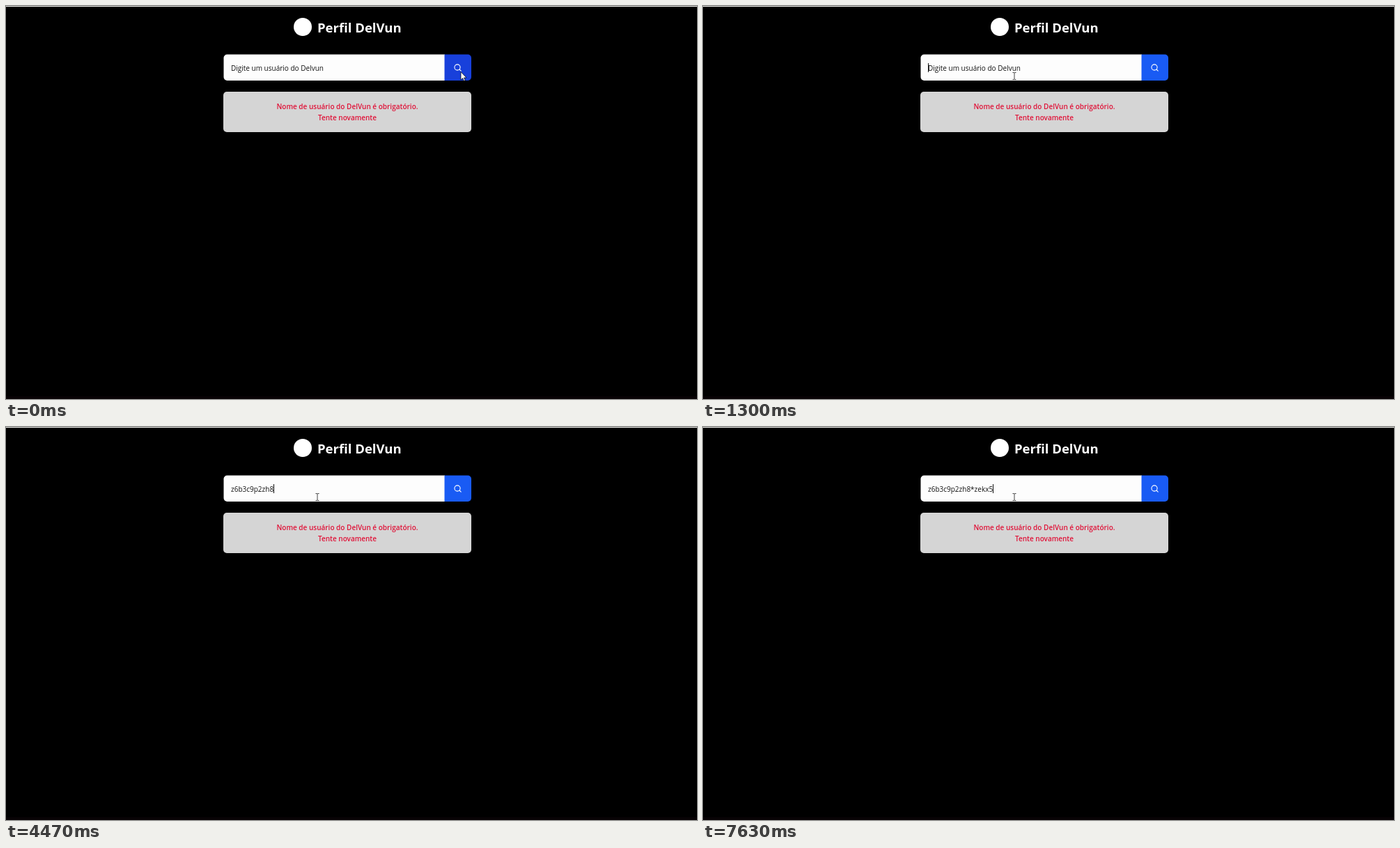
Animation of 992 by 564 pixels, one loop 8000 ms. Source, as an HTML page:

```html
<!DOCTYPE html>
<html lang="pt-BR">
<head>
<meta charset="utf-8">
<title>Perfil DelVun</title>
<style>
  html, body { margin: 0; width: 100%; height: 100%; overflow: hidden; background: #000; }
  svg { display: block; width: 992px; height: 564px; }
  text { font: 10px "Open Sans", "Noto Sans", sans-serif; white-space: pre; }
  .title { font-size: 18.5px; font-weight: 700; fill: #fff; }
  .error { font-weight: 600; fill: #e01238; text-anchor: middle; }
</style>
</head>
<body>
<svg viewBox="0 0 992 564">
  <rect width="992" height="564"/>
  <rect width="992" height="1" fill="#f4f4f0"/>
  <rect y="560" width="992" height="4" fill="#080305"/>

  <circle cx="426" cy="30" r="13" fill="#fff"/>
  <text class="title" x="447" y="37.5">Perfil DelVun</text>

  <path d="M630 69.5H317.5a5 5 0 0 0-5 5v27.500a5 5 0 0 0 5 5H630z" fill="#fdfdfd"/>
  <path id="button" d="M629.500 69.500H663a5 5 0 0 1 5 5v27.500a5 5 0 0 1-5 5H629.500z"/>
  <g fill="none" stroke="#fff" stroke-width="1.100" stroke-linecap="round">
    <circle cx="648" cy="88" r="4.100"/>
    <path d="M651 91l2.200 2.200"/>
  </g>
  <text id="field" x="323" y="92.500" fill="#151515"></text>
  <rect id="caret" y="82" width="1" height="13" fill="#111"/>

  <rect x="312" y="123" width="356" height="58" rx="5" fill="#d5d5d5"/>
  <text class="error" x="490" y="148">Nome de usuário do DelVun é obrigatório.</text>
  <text class="error" x="490" y="163.500">Tente novamente</text>

  <path id="arrow" d="M0 0V11.500L2.700 9.100L4.400 13L6.200 12.200L4.500 8.400H8z"
        fill="#fff" stroke="#000" stroke-width=".7"/>
  <path id="beam" d="M-2.500-5H-.8L0-4.400L.8-5H2.500M0-4.400V4.400M-2.500 5H-.8L0 4.400L.8 5H2.500"
        fill="none" stroke="#444" stroke-width="1"/>
</svg>
<script>
  const LOOP = 8000;
  const HINT = "Digite um usuário do Delvun";
  const TYPED = "z6b3c9p2zh8*zekx5";
  const BUTTON_LEFT = 629;
  const HOVER = [24, 64, 219], IDLE = [25, 91, 244];

  // Bursts of keys: start time, time per key, number of keys
  const BURSTS = [[2330, 0, 1], [3000, 30, 9], [3470, 0, 1], [5970, 60, 5], [6470, 0, 1]];
  // Times between which the caret is shown
  const CARET_ON = [[1150, 3470], [4470, 4800], [5430, 6470], [6700, 7030], [7630, LOOP]];

  const el = id => document.getElementById(id);
  const [button, field, caret, arrow, beam] = ["button", "field", "caret", "arrow", "beam"].map(el);
  const clamp = v => Math.min(1, Math.max(0, v));
  const smooth = s => s * s * (3 - 2 * s);
  const show = (node, on) => node.setAttribute("visibility", on ? "visible" : "hidden");

  function keysAt(t) {
    return BURSTS.reduce((sum, [start, step, count]) => {
      if (t < start) return sum;
      return sum + (step ? Math.min(count, 1 + Math.floor((t - start) / step)) : count);
    }, 0);
  }

  function drawPointer(t) {
    const s = clamp((t - 30) / 640);
    const x = 653 - 206 * smooth(s ** 1.9);
    const y = 94.5 + 6 * s ** 0.85;
    const place = `translate(${x.toFixed(1)} ${y.toFixed(1)})`;
    const over = x >= BUTTON_LEFT;
    arrow.setAttribute("transform", place);
    beam.setAttribute("transform", place);
    show(arrow, over);
    show(beam, !over);
  }

  function drawButton(t) {
    const k = smooth(clamp((t - 330) / 150));
    const mix = HOVER.map((v, i) => Math.round(v + (IDLE[i] - v) * k));
    button.setAttribute("fill", `rgb(${mix})`);
  }

  function drawField(t) {
    const n = keysAt(t);
    const label = n ? TYPED.slice(0, n) : HINT;
    if (field.textContent !== label) field.textContent = label;
    const end = n ? field.getComputedTextLength() : 0;
    caret.setAttribute("x", Math.round(323 + end - 0.5));
    show(caret, CARET_ON.some(([a, b]) => t >= a && t < b));
  }

  function render(t) {
    drawPointer(t);
    drawButton(t);
    drawField(t);
  }

  const begin = performance.now();
  function tick() {
    render((performance.now() - begin) % LOOP);
    requestAnimationFrame(tick);
  }
  tick();
</script>
</body>
</html>
```
